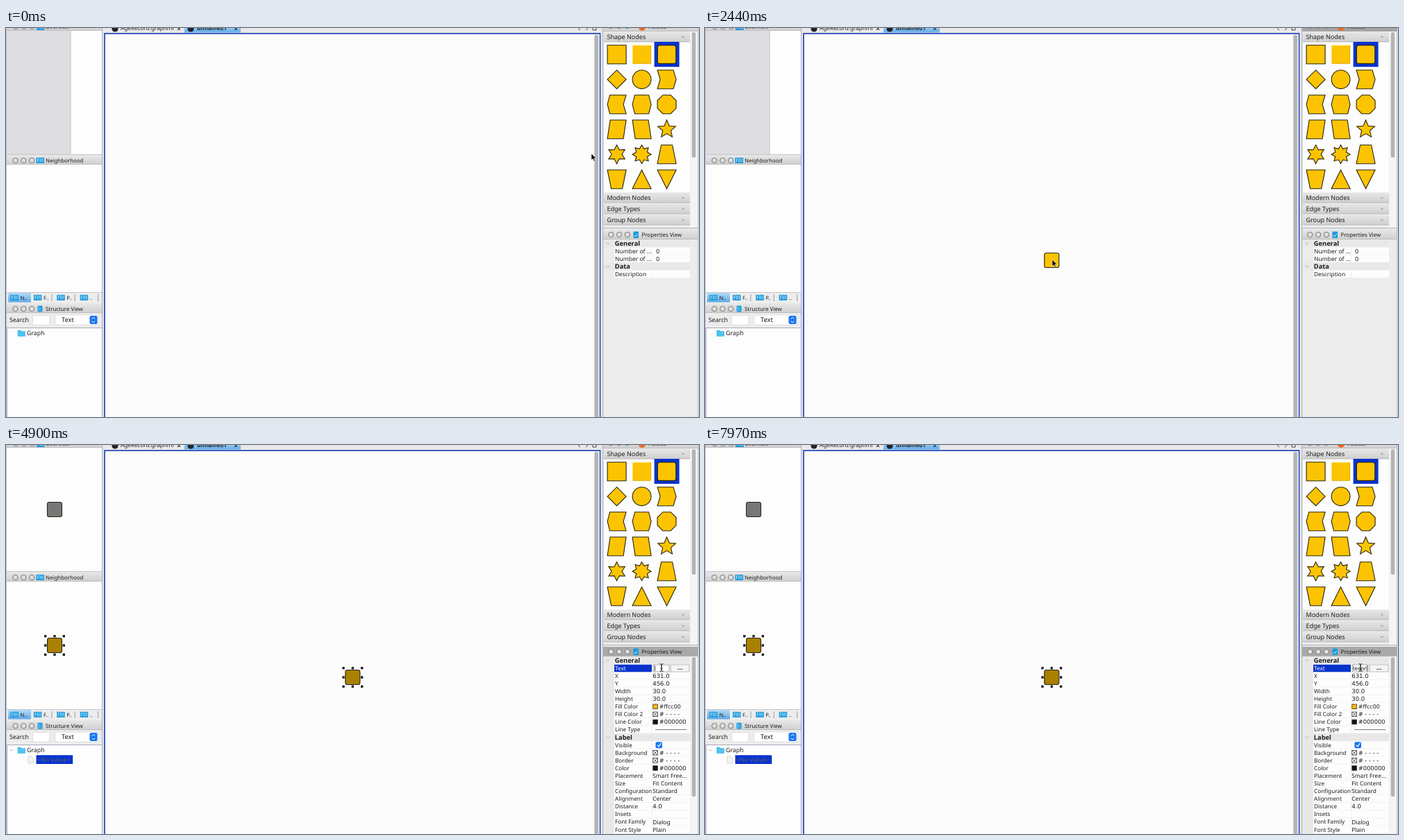
These frames come from a looping animation (998x561 px, 8 s). An HTML page:

```html
<!DOCTYPE html>
<html lang="en">
<head>
<meta charset="utf-8">
<title>Graph editor</title>
<style>
html, body { margin: 0; width: 100%; height: 100%; overflow: hidden; background: #e9e9e9; }
svg { display: block; width: 100vw; height: 100vh; }
text { font-family: "Noto Sans", sans-serif; fill: #1c1c1c; white-space: pre; text-rendering: geometricPrecision; }
.num { font-family: "DejaVu Sans", sans-serif; }
.b { font-weight: 700; }
</style>
</head>
<body>
<svg id="stage" viewBox="0 0 998 561" xmlns="http://www.w3.org/2000/svg"></svg>
<script>
const LOOP = 8000, BLUE = '#0733cd', GOLD = '#fcc400', INK = '#2a2410';
const stage = document.getElementById('stage');

const rect = (x, y, w, h, fill, more = '') =>
  `<rect x="${x}" y="${y}" width="${w}" height="${h}" fill="${fill}" ${more}/>`;
const text = (x, y, s, size = 8.2, more = '') =>
  `<text x="${x}" y="${y + size * 0.36}" font-size="${size}" ${more}>${s.replace(/</g, '&lt;')}</text>`;
const path = (d, stroke, width = 1, fill = 'none') =>
  `<path d="${d}" fill="${fill}" stroke="${stroke}" stroke-width="${width}"/>`;
const poly = pts => `<polygon points="${pts}" fill="${GOLD}" stroke="${INK}" stroke-width="1.1"/>`;
const group = (id, body, more = '') => `<g id="${id}" ${more}>${body}</g>`;

const lights = (x, y) => [0, 11.8, 23.6].map(d =>
  `<circle cx="${x + d}" cy="${y}" r="3.7" fill="#dedede" stroke="#777" stroke-width="1"/>`).join('');
const filterIcon = (x, y) => rect(x, y - 4, 11.5, 8, '#1496dc') +
  path(`M${x + 2} ${y + 2.5}v-5h2M${x + 2} ${y}h1.5M${x + 5.3} ${y - 3}v5.5M${x + 7.3} ${y - 3}v5.5M${x + 9.5} ${y - 3}v5.5`, '#bfe6fa', 0.9);
const header = (x, y, w, h = 14) => rect(x, y, w, h, 'url(#bar)') + path(`M${x} ${y + h - 0.5}h${w}`, '#bdbdbd');
const chevron = (x, y) => path(`M${x - 2.5} ${y - 1.2}l2.5 2.5l2.5 -2.5`, '#aaa', 0.9);

function leftSide() {
  let s = rect(0, 0, 140, 561, '#e6e6e8');
  s += rect(1, 4, 138, 178, '#fdfdfd') + header(1, -9, 138, 13);
  s += lights(14, -2) + filterIcon(44, -1) + text(57, -1.5, 'Overview', 7.9);
  s += group('shade', rect(1, 4, 92, 178, '#dedee0') + path('M93 4v178', '#c4c4cc'));
  s += header(1, 184, 138, 13) + lights(13.5, 191) + filterIcon(43.5, 191) + text(57, 191, 'Neighborhood', 7.9);
  s += rect(1, 197, 138, 184, '#fdfdfd');
  s += rect(1, 381, 138, 16, '#ededed') + rect(3, 382, 33, 13.5, 'url(#tab)');
  ['N..', 'F..', 'P..', '..'].forEach((label, i) => {
    const x = 6.5 + i * 33.4;
    s += filterIcon(x, 388.8) + text(x + 14, 389, label, 7.6, i ? 'fill="#aaa"' : '');
    if (i) s += path(`M${x + 26} 384v10`, '#999');
  });
  s += header(1, 398, 138, 13) + lights(13.5, 405) + rect(45.5, 400.5, 7, 9, '#1b9be0', 'rx="1"');
  s += path('M47.5 402v6M49 404h2M49 407h2', '#a8dcf6', 0.8) + text(57, 405, 'Structure View', 7.9);
  s += rect(1, 411, 138, 21, '#ececec') + text(5, 421, 'Search', 8.8);
  s += rect(38.5, 414.5, 24, 14, '#fff', 'stroke="#dedede"');
  s += rect(71, 414, 61, 14, '#fff', 'rx="3" stroke="#dcdcdc" stroke-width=".7"') + text(80, 421, 'Text', 9.3);
  s += rect(120.5, 415, 11, 12, '#1676f4', 'rx="2.5"');
  s += path('M123.8 419.6l2.2 -2.4l2.2 2.4M123.8 422.6l2.2 2.4l2.2 -2.4', '#fff');
  s += rect(1.5, 432.5, 137, 140, '#fdfdfd', 'stroke="#a9a9be"');
  s += path('M17 436h4l1 1.5h5.5v7h-10.5z', '#2aa8df', 0.5, '#4fc3ef') + text(30, 440, 'Graph', 8.8);
  s += path('M.5 0V561', '#bcbcd0') + path('M1 182.5h138M1 381.5h138', '#c4c4cc') + path('M138.6 0V561', '#a6a6bb');
  return s;
}

function center() {
  let s = rect(139, 0, 720, 561, '#e6e6ea') + rect(141, 0, 716, 7, '#e9e9e9');
  s += rect(257, -4, 81, 10.5, 'url(#tab)');
  s += '<circle cx="157" cy="1" r="4.6" fill="#20232a"/><circle cx="266" cy="1" r="4.6" fill="#20232a"/>';
  s += text(165, 0, 'AgeRecord.graphml', 8.2, 'fill="#a5a5a5"') + text(275, 0, 'unnamed1', 8, 'class="b"');
  s += path('M247 -2l4 5m0 -5l-4 5M329 -2l4 5m0 -5l-4 5', '#222', 1.1);
  s += path('M827 -2l-3 2.5l3 2.5M835 -2l3 2.5l-3 2.5M845 -1h5v4h-5z', '#444');
  s += rect(142, 8, 713.5, 560, '#fcfcfd', `stroke="#2246b8" stroke-width="1.7"`);
  s += rect(846, 9, 8.5, 552, '#ededed') + rect(847.7, 10, 5.2, 560, '#b3b3b3', 'rx="2.5"');
  return s;
}

const star = (cx, cy, n, inner) => Array.from({ length: 2 * n }, (_, i) => {
  const a = i * Math.PI / n - Math.PI / 2, r = i % 2 ? inner : 13.5;
  return `${(cx + r * Math.cos(a)).toFixed(2)},${(cy + r * Math.sin(a)).toFixed(2)}`;
}).join(' ');

// Corner points are relative to the cell centre.
const SHAPES = [
  [-13.5, -13.5, 13.5, -13.5, 13.5, 13.5, -13.5, 13.5], 'plain', 'round',
  [0, -13.5, 13.5, 0, 0, 13.5, -13.5, 0], 'circle', [-13.5, -13.5, 9.5, -13.5, 13.5, 0, 9.5, 13.5, -13.5, 13.5, -9.5, 0],
  [-10, -13.5, 13.5, -13.5, 9.5, 0, 13.5, 13.5, -10, 13.5, -13.5, 0], [-10, -13.5, 10, -13.5, 13.5, 0, 10, 13.5, -10, 13.5, -13.5, 0],
  [-5.6, -13.5, 5.6, -13.5, 13.5, -5.6, 13.5, 5.6, 5.6, 13.5, -5.6, 13.5, -13.5, 5.6, -13.5, -5.6],
  [-9.5, -13.5, 13.5, -13.5, 9.5, 13.5, -13.5, 13.5], [-13.5, -13.5, 9.5, -13.5, 13.5, 13.5, -9.5, 13.5], 'star5',
  'star6', 'star8', [-8, -13.5, 8, -13.5, 13.5, 13.5, -13.5, 13.5],
  [-13.5, -13.5, 13.5, -13.5, 8, 13.5, -8, 13.5], [0, -13.5, 13.5, 13.5, -13.5, 13.5], [-13.5, -13.5, 13.5, -13.5, 0, 13.5]
];

function shape(kind, i) {
  const x = 879.6 + 36 * (i % 3), y = 38.2 + 36 * Math.floor(i / 3);
  if (Array.isArray(kind)) return poly(kind.map((v, k) => +(v + (k % 2 ? y : x)).toFixed(1)).join(' '));
  if (kind === 'plain') return rect(x - 13, y - 13, 26, 26, GOLD) + path(`M${x - 13} ${y + 13}v-26h26`, '#ffd84a') + path(`M${x - 13} ${y + 13}h26v-26`, '#d9a800');
  if (kind === 'round') return rect(x - 18, y - 18.2, 36, 36, BLUE) + rect(x - 13.2, y - 13.2, 26.4, 26.4, GOLD, `rx="3.5" stroke="${INK}" stroke-width="1.1"`);
  if (kind === 'circle') return `<circle cx="${x}" cy="${y}" r="13.4" fill="${GOLD}" stroke="${INK}" stroke-width="1.1"/>`;
  const n = +kind[4];
  return poly(star(x, y, n, { 5: 6.2, 6: 7.4, 8: 8.5 }[n]));
}

function rightSide() {
  let s = rect(858, 0, 140, 561, '#e7e7ea') + rect(860, 0, 137, 288, '#ececec');
  s += header(860, -9, 137, 14) + group('paletteFocus', rect(860, 0, 137, 5, '#a4a4a4'));
  s += lights(871, -3) + '<circle cx="916" cy="-1" r="5" fill="#f06a1d"/>' + text(925, -2, 'Palette', 7.9);
  s += rect(861, 20, 124, 217, '#fdfdfd');
  [['Shape Nodes', 12.8], ['Modern Nodes', 244.8], ['Edge Types', 260.8], ['Group Nodes', 276.8]].forEach(([name, y], i) => {
    s += header(861, y - 7, 124, 14.5) + text(865.5, y, name, 9);
    s += path(i ? `M973.3 ${y - 1}l1.7 2l1.7 -2` : `M973.3 ${y + 1}l1.7 -2l1.7 2`, '#777', 0.8);
  });
  s += SHAPES.map(shape).join('');
  s += rect(985.5, 5, 10.5, 283, '#f4f4f4') + rect(987.7, 6, 5.6, 181, '#b5b5b5', 'rx="2.8"');
  s += path('M860 288.5h137', '#b5b5c2') + rect(860, 305, 137, 256, '#ececec');
  s += header(860, 291, 137, 14) + group('propsFocus', rect(860, 291, 137, 13.5, '#a9a9a9'));
  s += lights(871.3, 298) + rect(903.5, 293.5, 7.5, 9.5, '#189adf', 'rx="1"') + path('M905 299l1.6 2l3 -4', '#d8f1fd');
  s += text(915.5, 298.3, 'Properties View', 7.9);
  s += group('emptyProps', emptyProps()) + group('nodeProps', nodeProps());
  s += path('M859.7 0V561', '#a9a9bd') + path('M996.7 0V561', '#b4b4c4');
  return s;
}

const rowY = i => 310.6 + i * 11.09;
const section = (i, name) => rect(861, rowY(i) - 5.5, 124, 11, '#e8e8e8') + chevron(867, rowY(i)) + text(876.8, rowY(i), name, 9.3, 'class="b"');
const entry = (i, name, size = 8.2) => rect(876, rowY(i) - 5.4, 109, 11.1, '#fdfdfd') +
  path(`M876 ${rowY(i) + 5.5}h109M930.5 ${rowY(i) - 5.5}v11`, '#ebebeb', 0.8) + text(877, rowY(i), name, size);

function emptyProps() {
  return section(0, 'General') + [1, 2].map(i => entry(i, 'Number of ...', 8.5) + text(936, rowY(i), '0', 8.4, 'class="num"')).join('') +
    section(3, 'Data') + entry(4, 'Description', 8.4);
}

const PROPS = [
  'General', 'Text|', 'X|631.0', 'Y|456.0', 'Width|30.0', 'Height|30.0', 'Fill Color|#ffcc00', 'Fill Color 2|#----',
  'Line Color|#000000', 'Line Type|line', 'Label', 'Visible|check', 'Background|#----', 'Border|#----', 'Color|#000000',
  'Placement|Smart Free...', 'Size|Fit Content', 'Configuration|Standard', 'Alignment|Center', 'Distance|4.0', 'Insets|',
  'Font Family|Dialog', 'Font Style|Plain'
];

function propValue(v, y) {
  if (v === 'line') return path(`M935 ${y}h45`, '#555', 0.8);
  if (v === 'check') return rect(935.5, y - 4.3, 9.5, 9, '#1676f4', 'rx="2"') + path(`M938 ${y}l2 2.4l3.2 -4.8`, '#fff', 1.2);
  if (v[0] === '#') {
    const none = v[1] === '-';
    const fill = none ? '#fff' : v === '#ffcc00' ? '#fcb900' : '#111';
    return rect(931.8, y - 3.2, 6.6, 6.6, fill, 'stroke="#333" stroke-width=".8"') +
      (none ? path(`M932 ${y - 3}l6.3 6.3m0 -6.3l-6.3 6.3`, '#333', 0.8) : '') +
      text(940.7, y, v, v === '#ffcc00' ? 8 : 8.4, `class="num"${none ? ' textLength="25" letter-spacing="2.6"'.replace(' textLength="25"', '') : ''}`);
  }
  return /\d/.test(v) ? text(931.2, y, v, 8.6, 'class="num"') : text(931.2, y, v, 8.4);
}

function nodeProps() {
  let s = rect(861, 305, 14.5, 256, '#e8e8e8');
  PROPS.forEach((p, i) => {
    const [name, v] = p.split('|');
    s += v === undefined ? section(i, name) : entry(i, name) + (v && propValue(v, rowY(i)));
  });
  s += rect(985.5, 305, 10.5, 256, '#f4f4f4') + rect(987.7, 306, 5.6, 201, '#b5b5b5', 'rx="2.8"');
  s += group('editor',
    rect(876, 316.7, 54, 10.6, BLUE) + text(877, 321.8, 'Text', 8.2, 'fill="#fff" style="fill:#fff"') +
    rect(931, 316.5, 54, 11, '#ececec') + rect(932.5, 317, 22.5, 10, '#fff', 'stroke="#999" stroke-width=".8"') +
    rect(957.5, 317, 26.5, 10, '#f5f5f5', 'stroke="#b5b5b5" stroke-width=".8"') + text(967, 321, '...', 9, 'class="b"') +
    `<g clip-path="url(#field)"><text id="typed" y="324.8" font-size="8.2"></text></g>` +
    '<path id="caret" stroke="#111" stroke-width=".8"/>');
  return s;
}

const node = (x, y, fill) => rect(x - 10.5, y - 10.5, 21, 21, fill, `rx="2.8" stroke="${INK}" stroke-width="1.1"`);
function selected(x, y) {
  let s = node(x, y, '#aa8000');
  for (const dx of [-13.3, 0, 13.3]) for (const dy of [-13.3, 0, 13.3])
    if (dx || dy) s += rect(x + dx - 1.7, y + dy - 1.7, 3.4, 3.4, '#222');
  return s;
}

const placed = node(70, 93, '#777') + selected(70, 289) + selected(499.3, 335) + chevron(8, 440) +
  path('M32 449h5l2.5 2.5v7.5h-7.5z', '#ccc', 0.7, '#f3f3f3') + rect(43.5, 447.3, 52.7, 12.7, BLUE) +
  text(45, 453.8, '<No Value>', 8.9, 'style="fill:#59606f"');

stage.innerHTML = `<defs>
<linearGradient id="bar" x2="0" y2="1"><stop stop-color="#e6e6e6"/><stop offset="1" stop-color="#cfcfcf"/></linearGradient>
<linearGradient id="tab" x2="0" y2="1"><stop stop-color="#b4dcf8"/><stop offset="1" stop-color="#5fa9e6"/></linearGradient>
<clipPath id="field"><rect x="933" y="317" width="21.5" height="10"/></clipPath></defs>` +
  leftSide() + center() + rightSide() + group('placed', placed) + group('ghost', node(0, 0, GOLD)) +
  group('arrow', path('M0 0V9.6L2.2 7.6L3.8 11.2L5.4 10.5L3.8 7H6.8Z', '#fff', 0.6, '#000')) +
  group('beam', path('M-2.5 -5.5q2.5 0 2.5 1.5v8q0 1.5 -2.5 1.5M2.5 -5.5q-2.5 0 -2.5 1.5v8q0 1.5 2.5 1.5M-1.5 1.5h3', '#222', 0.9));

const $ = id => document.getElementById(id);
const show = (id, on) => $(id).setAttribute('display', on ? 'inline' : 'none');
const move = (id, x, y) => $(id).setAttribute('transform', `translate(${x} ${y})`);

// Pointer stops: time, x, y.
const STOPS = [[0, 843, 181], [150, 843, 181], [950, 959, 38], [1350, 959, 38], [1900, 565, 266],
  [2350, 500, 334], [3000, 500, 334], [3750, 945, 320], [4400, 945, 320], [4700, 944, 321], [LOOP, 944, 321]];
const PRESS = 1350, DROP = 2450, CLICK = 4450, TYPE = 5780, WORD = 'PetRecor', STEP = 250;

function pointer(t) {
  const i = STOPS.findIndex(s => s[0] > t);
  const [t0, x0, y0] = STOPS[i - 1], [t1, x1, y1] = STOPS[i];
  const k = (t - t0) / (t1 - t0), e = k * k * (3 - 2 * k);
  return [x0 + (x1 - x0) * e, y0 + (y1 - y0) * e];
}

function update(t) {
  const [x, y] = pointer(t), dropped = t >= DROP, editing = t >= CLICK;
  show('shade', !dropped);
  show('emptyProps', !dropped);
  show('nodeProps', dropped);
  show('placed', dropped);
  show('paletteFocus', t >= PRESS && !dropped);
  show('propsFocus', editing);
  show('editor', editing);
  show('ghost', t >= PRESS && !dropped && x < 835);
  show('arrow', !editing);
  show('beam', editing);
  const settle = Math.min(1, Math.max(0, (t - 1900) / 450));
  move('ghost', x + 10 - 10.7 * settle, y - 5.3 + 6.3 * settle);
  move('arrow', x, y);
  move('beam', x, y);

  const count = Math.max(0, Math.min(WORD.length, Math.floor((t - TYPE) / STEP) + 1));
  const typed = $('typed'), long = count > 3;
  typed.textContent = WORD.slice(0, count);
  typed.setAttribute('text-anchor', long ? 'end' : 'start');
  typed.setAttribute('x', long ? 952.5 : 934);
  const caretX = long ? 953.3 : 934.5 + (count ? typed.getComputedTextLength() : 0);
  $('caret').setAttribute('d', `M${caretX} 318v8`);
}

function tick() {
  update(performance.now() % LOOP);
  requestAnimationFrame(tick);
}
tick();
</script>
</body>
</html>
```
